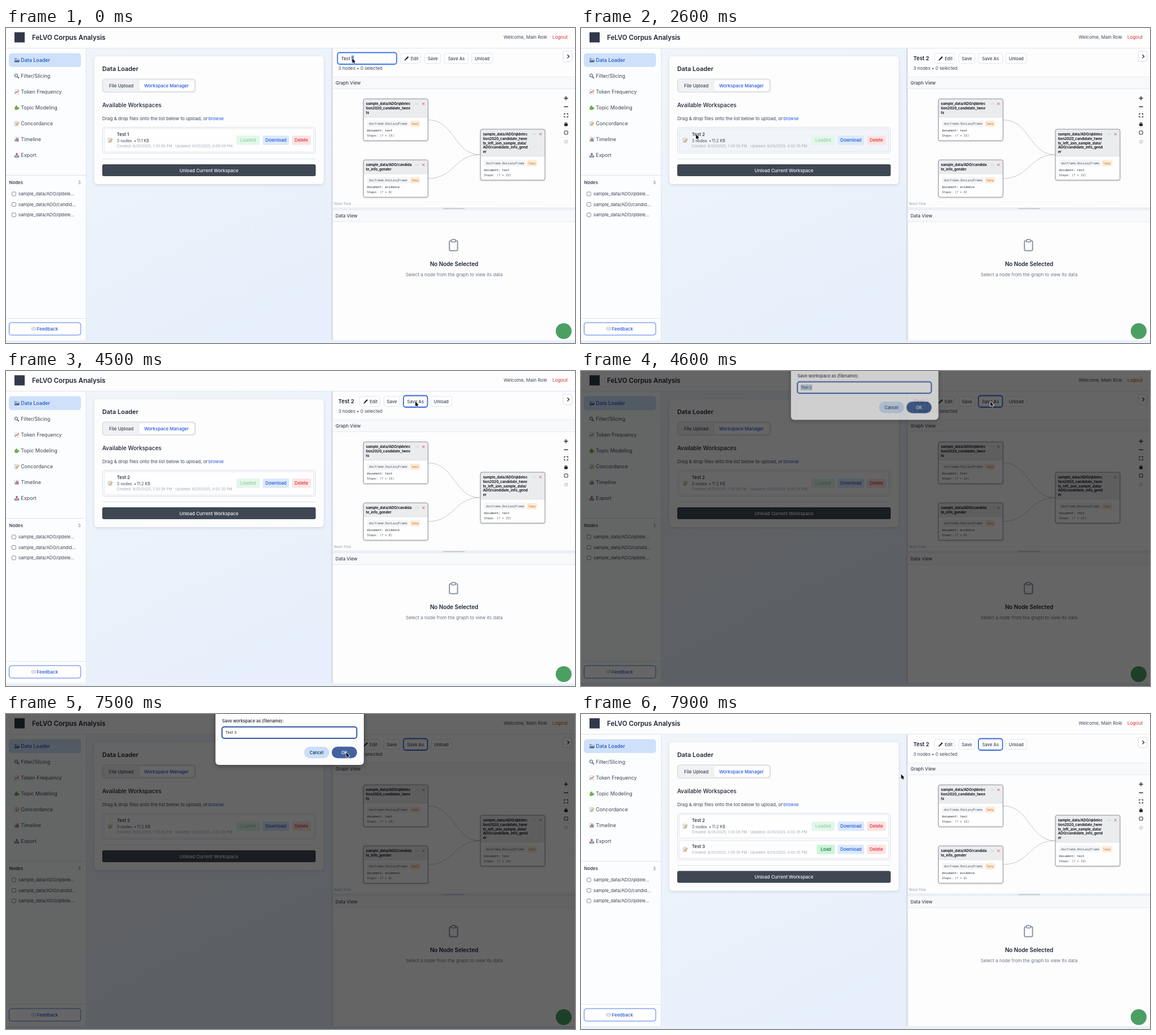
Recreate the animation shown at these times as an HTML page with a canvas. Size 1005 px wide and 557 px high, loop 8 s.

```html
<!DOCTYPE html>
<html lang="en">
<head>
<meta charset="utf-8">
<title>Corpus Analysis</title>
<style>
html, body { margin: 0; width: 100%; height: 100%; overflow: hidden; background: #fff; }
canvas { display: block; width: 1005px; height: 557px; }
</style>
</head>
<body>
<canvas id="stage"></canvas>
<script>
const W = 1005, H = 557, LOOP = 8000;
const SANS = 'Inter, "Open Sans", sans-serif';
const MONO = '"DejaVu Sans Mono", "Liberation Mono", monospace';
const INK = '#1c2330', BODY = '#3d4654', MUTED = '#6b7482', BLUE = '#2257d6', RED = '#d8302f';
const dpr = window.devicePixelRatio || 1;

function setUp(canvas) {
  canvas.width = W * dpr;
  canvas.height = H * dpr;
  const ctx = canvas.getContext('2d');
  ctx.scale(dpr, dpr);
  return ctx;
}

const stage = setUp(document.getElementById('stage'));
const layer = setUp(document.createElement('canvas'));
let c = stage; // where the helpers draw

// Times of the hard changes, in ms
const TYPED = 500, RENAMED = 900, SAVED = 1000, FOCUS = 4300, OPEN = 4600,
      CLICKED = 5900, ERASED = 6500, RETYPED = 6800, CLOSE = 7700, ADDED = 7800;

// Pointer stops: time, x, y
const POINTER = [
  [0, 611.5, 53.5], [1200, 611.5, 53.5], [2200, 203, 188], [3100, 203, 188],
  [4200, 723, 54], [4900, 723, 54], [5800, 437, 40], [6800, 437, 40],
  [7300, 601, 68], [7650, 601, 68], [7900, 565.5, 106.5], [LOOP, 565.5, 106.5]
];

function pointerAt(t) {
  const i = POINTER.findIndex(p => p[0] > t);
  const [t0, x0, y0] = POINTER[i - 1], [t1, x1, y1] = POINTER[i];
  const p = (t - t0) / (t1 - t0), e = p * p * (3 - 2 * p);
  return [x0 + (x1 - x0) * e, y0 + (y1 - y0) * e];
}

const inside = ([px, py], x, y, w, h) => px >= x && px <= x + w && py >= y && py <= y + h;

function rect(x, y, w, h, fill) {
  c.fillStyle = fill;
  c.fillRect(x, y, w, h);
}

function box(x, y, w, h, r, fill, stroke, lw = 1) {
  c.beginPath();
  c.roundRect(x, y, w, h, r);
  if (fill) { c.fillStyle = fill; c.fill(); }
  if (stroke) { c.strokeStyle = stroke; c.lineWidth = lw; c.stroke(); }
}

function line(color, lw, ...pts) {
  c.beginPath();
  for (let i = 0; i < pts.length; i += 2) c.lineTo(pts[i], pts[i + 1]);
  c.strokeStyle = color;
  c.lineWidth = lw;
  c.stroke();
}

function poly(fill, ...pts) {
  c.beginPath();
  for (let i = 0; i < pts.length; i += 2) c.lineTo(pts[i], pts[i + 1]);
  c.closePath();
  c.fillStyle = fill;
  c.fill();
}

function disc(x, y, r, fill, stroke, lw = 1) {
  c.beginPath();
  c.arc(x, y, r, 0, 7);
  if (fill) { c.fillStyle = fill; c.fill(); }
  if (stroke) { c.strokeStyle = stroke; c.lineWidth = lw; c.stroke(); }
}

// y is the middle of the capitals
function text(s, x, y, size, color = BODY, weight = 400, align = 'left', font = SANS) {
  c.font = `${weight} ${size}px ${font}`;
  c.textAlign = align;
  c.fillStyle = color;
  c.fillText(s, x, y + size * 0.36);
}

const mono = (s, x, y, color = '#4a5261') => text(s, x, y, 5.34, color, 400, 'left', MONO);

function shadow(color, blur, dy, draw) {
  c.save();
  c.shadowColor = color;
  c.shadowBlur = blur * dpr;
  c.shadowOffsetY = dy * dpr;
  draw();
  c.restore();
}

// Small pictures, each about 9 px wide around its own centre
const icons = {
  folder() {
    box(-4, -3.5, 4, 3, 1, '#5b83b4');
    box(-4, -2.5, 8.5, 6, 0.8, '#7fa3c9');
    rect(-2.5, -1.5, 6, 1.5, '#e9e2b8');
    poly('#4c6f9c', -4, 3.5, -2.5, 0, 5, 0, 4, 3.5);
  },
  search() {
    line('#4a4f58', 1.5, 1, 1, 4, 4);
    disc(-1, -1, 2.8, '#cfe5f4', '#59606b', 1);
  },
  chart() {
    box(-4, -4, 8, 8, 0.5, '#f4f6f8', '#c3ccd6', 0.6);
    line('#d8443c', 1.1, -3.4, 2.6, -1, -0.2, 0.6, 1, 3.4, -3);
  },
  puzzle() {
    box(-3.6, -1.8, 6, 5.6, 0.8, '#6fae4a');
    disc(-0.6, -2.4, 1.5, '#6fae4a');
    disc(3, 0.8, 1.5, '#6fae4a');
  },
  memo() {
    box(-3.8, -4, 6.8, 8, 0.5, '#f1f1ec', '#b9bcc0', 0.6);
    for (let y = -2; y < 3; y += 1.6) line('#a9b3bd', 0.6, -2.6, y, 1.8, y);
    line('#e0a030', 1.6, -0.6, 2.4, 4, -2);
    line('#4c4033', 1, -1.2, 3, -0.5, 2.3);
  },
  bars() {
    box(-4, -4, 8, 8, 0.5, '#f4f6f8', '#c3ccd6', 0.6);
    rect(-3, -0.5, 1.6, 4, '#49a35a');
    rect(-0.8, -3, 1.6, 6.5, '#d8443c');
    rect(1.4, -1.6, 1.6, 5.1, '#3b78c9');
  },
  tray() {
    poly('#6b8fb8', -4.2, 0, 4.2, 0, 4.2, 4, -4.2, 4);
    rect(-2.4, 0.4, 4.8, 1.5, '#dfe8f1');
    poly('#d8443c', 0, -4.4, 2.6, -1.6, 0.9, -1.6, 0.9, 1, -0.9, 1, -0.9, -1.6, -2.6, -1.6);
  },
  bubble() {
    box(-4, -3, 8, 5.4, 2.6, '#f3f5f8', '#9aa4b2', 0.7);
    for (const x of [-2, 0, 2]) disc(x, -0.3, 0.5, '#6b7482');
  },
  pencil() {
    line('#1c2330', 2.2, -1.8, 1.8, 2.8, -2.8);
    poly('#1c2330', -4, 4, -3, 1, -1, 3);
  }
};

function icon(name, x, y) {
  c.save();
  c.translate(x, y);
  icons[name]();
  c.restore();
}

function header() {
  rect(0, 0, W, 36, '#fdfdfe');
  rect(0, 35.3, W, 1, '#dde4ee');
  rect(15, 7.5, 18, 18, '#33384a');
  text('FeLVO Corpus Analysis', 46, 16.7, 11.5, INK, 600);
  text('Welcome, Main Role', 879, 16.5, 8, BODY);
  text('Logout', 965, 16.5, 8.2, RED);
}

const MENU = [['folder', 'Data Loader'], ['search', 'Filter/Slicing'], ['chart', 'Token Frequency'],
  ['puzzle', 'Topic Modeling'], ['memo', 'Concordance'], ['bars', 'Timeline'], ['tray', 'Export']];

function sidebar() {
  rect(0, 36, 141, 516, '#fcfdfe');
  rect(141, 36, 1, 516, '#dfe5ee');
  box(5.5, 45, 126.5, 23.5, 4.5, '#cfe1fa', '#c0d7f6', 0.6);
  MENU.forEach(([pic, label], i) => {
    const y = 57 + i * 28;
    icon(pic, 19, y);
    text(label, 26.3, y, 8.9, i ? BODY : '#2052c4', i ? 400 : 500);
  });
  rect(0, 260, 141, 1, '#dfe3ea');
  text('Nodes', 5.5, 273.5, 7.8, BODY, 600);
  text('3', 132, 273.5, 7.5, MUTED, 400, 'right');
  ['qldele', 'candid', 'qldele'].forEach((s, i) => {
    const y = 293.3 + i * 18.5;
    box(10.5, y - 3.3, 6.8, 6.8, 1.3, '#fff', '#767c86', 0.9);
    text(`sample_data/ADO/${s}...`, 22, y, 7.9, BODY);
  });
  rect(0, 513, 141, 1, '#dfe3ea');
  box(5.5, 521, 126.5, 22, 4, '#fff', '#4a7ae8');
  icon('bubble', 49, 532);
  text('Feedback', 54.5, 532, 8, BLUE, 500);
}

function pill(label, x, y, w, fill, color) {
  box(x, y - 8.2, w, 16.4, 2.5, fill);
  text(label, x + w / 2, y, 7.8, color, 500, 'center');
}

function row(y, h, name, size, updated, hover) {
  const mid = y + h / 2;
  box(173.5, y, 370, h, 3, hover ? '#f1f4f9' : '#fefeff', '#dde2ea', 0.8);
  icon('memo', 184, mid);
  text(name, 195.8, y + 10.5, 7.9, INK, 500);
  if (size) {
    text('3 nodes', 195.8, y + 21, 7.1, BODY);
    text('•', 226, y + 21, 7.1, BODY);
    text(size, 231.3, y + 21, 7.1, BODY);
  }
  const low = y + h - 10;
  text('Created: 8/25/2025, 1:30:38 PM', 195.8, low, 6.45, '#a2a9b5');
  text('Updated: 8/25/2025, ' + updated, 299, low, 6.45, '#a2a9b5');
  if (size) pill('Loaded', 407, mid, 41.5, '#e3f7ea', '#8fcda4');
  else pill('Load', 416.5, mid, 32, '#cbf4d8', '#1c6b3a');
  pill('Download', 453.5, mid, 46.5, '#dbe9fd', BLUE);
  pill('Delete', 505, mid, 33.5, '#fde3e3', RED);
}

function loader(t, pointer) {
  const saved = t >= SAVED, extra = t >= ADDED ? 36.4 : 0;
  const bg = c.createLinearGradient(142, 36, 400, 557);
  bg.addColorStop(0, '#f1f5fa');
  bg.addColorStop(1, '#e6effb');
  rect(142, 36, 433, 521, bg);
  shadow('rgba(40,60,100,.16)', 5, 1.5, () => box(156, 50, 405, 226 + extra, 5, '#fdfdfe'));
  text('Data Loader', 170, 72.3, 10.9, INK, 600);
  box(170.5, 90, 164, 23.5, 5, '#f0f1f3', '#d3d6dc', 1.2);
  box(235, 92, 97.5, 19.5, 4, '#fff', '#e1e4e9', 0.6);
  text('File Upload', 182, 102, 8.05, BODY, 500);
  text('Workspace Manager', 244, 102, 7.95, BLUE, 500);
  text('Available Workspaces', 170, 136.5, 9.95, INK, 500);
  text('Drag & drop files onto the list below to upload, or', 170, 160, 8.08, BODY);
  text('browse', 357.5, 160, 7.8, BLUE);
  box(170.5, 175.5, 376, 46 + extra, 4, '#f9fafc', '#d9dfe8', 0.9);
  const hover = t < OPEN && inside(pointer, 173, 178, 371, 41);
  row(178, 41, saved ? 'Test 2' : 'Test 1', saved ? '11.2 KB' : '11.1 KB',
      saved ? '4:02:35 PM' : '4:00:39 PM', hover);
  if (extra) row(224, 31, 'Test 3', '', '4:02:35 PM', false);
  rect(170, 231 + extra, 377, 1, '#dde2ea');
  box(170, 241 + extra, 377, 21, 3, '#3e4752');
  text('Unload Current Workspace', 358.5, 251.7 + extra, 8, '#f2f4f6', 500, 'center');
}

function tool(label, x, w, focus) {
  box(x, 45, w, 17.5, 3, '#fff', '#dfe3e9', 0.9);
  if (focus) box(x, 43.5, w, 20.5, 4, null, '#3a6fe0', 1.8);
  if (label === 'Edit') {
    icon('pencil', x + 11, 53.7);
    text(label, x + 18, 54, 7.6, BODY, 500);
  } else text(label, x + w / 2, 54, 7.7, BODY, 500, 'center');
}

function toolbar(t) {
  const edit = t < RENAMED, dx = edit ? 72.2 : 0;
  if (edit) {
    box(585.5, 43.5, 104.5, 20.5, 4, '#fff', '#3a76ee', 1.8);
    if (t < TYPED) rect(610, 48.5, 4.6, 10.5, '#78a8f8');
    text(t < TYPED ? 'Test 1' : 'Test 2', 592, 54, 7.9, INK);
  } else text('Test 2', 587, 54, 9.5, INK, 600);
  tool('Edit', 624.5 + dx, 35.5);
  tool('Save', 667.5 + dx, 28);
  tool('Save As', 702 + dx, 42.5, t >= FOCUS);
  tool('Unload', 750.5 + dx, 36.5);
  text('3 nodes • 0 selected', 587, 71, 7.9, BODY);
  box(984, 41, 16, 18.5, 3, '#fff', '#d5d9e0', 0.9);
  line(INK, 1.3, 991.5, 47.2, 994.6, 50.3, 991.5, 53.4);
}

function node(x, y, h, lines, doc, cols) {
  const head = 9 + lines.length * 7.7, end = y + h;
  shadow('rgba(0,0,0,.2)', 3, 1, () => box(x, y, 114, h, 3, '#fefefe'));
  box(x, y, 114, head, [3, 3, 0, 0], '#ebecee');
  rect(x, y + head, 114, 0.7, '#d3d6da');
  box(x, y, 114, h, 3, null, '#8d9198', 1);
  lines.forEach((s, i) => text(s, x + 4.4, y + 8.6 + i * 7.85, 6.2, '#14181f', 700));
  for (let i = 0; i < 3; i++) disc(x + 92.7 + i * 2.2, y + 8.8, 0.5, '#8a919c');
  line('#d8463f', 0.9, x + 104, y + 6.7, x + 108, y + 10.7);
  line('#d8463f', 0.9, x + 108, y + 6.7, x + 104, y + 10.7);
  box(x + 6.5, end - 35.5, 73.5, 11, 2, '#f3f4f6');
  mono('docframe.DocLazyFrame', x + 10, end - 30);
  box(x + 82, end - 35.5, 18, 11, 2.5, '#fdebd6');
  mono('lazy', x + 84.6, end - 30, '#c2571a');
  mono('document: ' + doc, x + 6.2, end - 18.3, '#222832');
  mono(`Shape: (? × ${cols})`, x + 6.2, end - 9.3);
}

function edge(y) {
  c.beginPath();
  c.moveTo(746, y);
  c.bezierCurveTo(792, y, 792, 224, 837, 224);
  c.strokeStyle = '#b4b6bb';
  c.lineWidth = 0.8;
  c.stroke();
}

function controls() {
  box(982, 116.5, 14.5, 92, 1, '#fefefe');
  for (let y = 131.5; y < 200; y += 15.4) rect(982, y, 14.5, 0.6, '#eceef1');
  line(INK, 1.4, 985.5, 124.2, 992.7, 124.2);
  line(INK, 1.4, 989.1, 120.6, 989.1, 127.8);
  line(INK, 1.4, 985.5, 139.3, 992.7, 139.3);
  for (const sx of [-1, 1]) for (const sy of [-1, 1])
    line(INK, 1.1, 989.2 + sx, 154.5 + sy * 3, 989.2 + sx * 3.2, 154.5 + sy * 3, 989.2 + sx * 3.2, 154.5 + sy);
  c.beginPath();
  c.arc(989, 168.7, 1.7, Math.PI, 0);
  c.strokeStyle = INK;
  c.lineWidth = 1;
  c.stroke();
  box(986.2, 168.8, 5.8, 4.6, 0.6, INK);
  box(986.2, 182, 6, 6, 1, null, INK, 1);
  disc(989.2, 201, 2.8, null, '#a7adb7', 0.8);
  line('#a7adb7', 0.8, 987.4, 202.9, 991, 199.1);
}

function sectionBar(label, y) {
  rect(577, y - 10.7, 428, 21.4, '#f8f9fb');
  rect(577, y - 10.7, 428, 0.8, '#e4e8ee');
  rect(577, y + 10, 428, 0.8, '#e1e5eb');
  text(label, 582, y, 8, BODY, 500);
}

function rightPanel(t) {
  rect(577, 36, 428, 516, '#fdfdfe');
  rect(574.5, 36, 2.8, 516, '#d6dce6');
  toolbar(t);
  sectionBar('Graph View', 97);
  for (let y = 113; y < 316; y += 9)
    for (let x = 582; x < W; x += 9) rect(x, y, 0.8, 0.8, '#e8eaee');
  edge(162.5);
  edge(266);
  node(631.3, 125.3, 74, ['sample_data/ADO/qldelec', 'tion2020_candidate_twee', 'ts'], 'text', 15);
  node(631.3, 233.2, 66, ['sample_data/ADO/candida', 'te_info_gender'], 'evidence', 8);
  node(838, 179, 90, ['sample_data/ADO/qldelec', 'tion2020_candidate_twee',
    'ts_left_join_sample_data/', 'ADO/candidate_info_gend', 'er'], 'text', 22);
  controls();
  text('React Flow', 579.3, 311, 5.8, '#9aa0a9');
  rect(577, 317, 428, 4.5, '#eceff4');
  rect(772, 318.7, 38, 1.2, '#b3bac6');
  sectionBar('Data View', 332);
  box(783.2, 376.3, 14.4, 17.5, 2.2, null, '#8d96a6', 2);
  box(786.8, 373.8, 7.2, 4.6, 1.6, '#fdfdfe', '#8d96a6', 1.8);
  text('No Node Selected', 791.5, 417, 9.8, INK, 600, 'center');
  text('Select a node from the graph to view its data', 791.5, 435.7, 8.08, MUTED, 400, 'center');
}

function dialog(t, pointer) {
  shadow('rgba(0,0,0,.35)', 8, 2, () => box(370, -12, 262, 102, 6, '#fdfdfe'));
  text('Save workspace as (filename):', 381.7, 12.3, 7.4, '#20242c', 500);
  box(381.5, 22.7, 238, 20.3, 4, '#fff', '#2f56a3', 2);
  if (t < CLICKED) rect(387.3, 27.5, 20.5, 10.5, '#c3d0e4');
  const value = t < ERASED ? 'Test 2' : t < RETYPED ? 'Test ' : 'Test 3';
  text(value, 387.5, 32.8, 6.8, '#20242c');
  box(526.5, 57.7, 44.5, 20.5, 10.2, '#cbdef8');
  text('Cancel', 548.5, 68, 7.4, '#16294a', 500, 'center');
  box(575.3, 57.7, 44.7, 20.5, 10.2, inside(pointer, 575, 57, 45, 21) ? '#43639f' : '#2e4f8b');
  text('OK', 597.5, 68, 7.3, '#fff', 500, 'center');
}

// Dims the page and lets the dialog slide and fade in as one sheet
function modalSheet(t, pointer) {
  const p = Math.min(1, (t - OPEN) / 100), k = 0.994 + 0.006 * p;
  c = layer;
  c.clearRect(0, 0, W, H);
  dialog(t, pointer);
  c = stage;
  rect(0, 0, W, H, 'rgba(0,0,0,.6)');
  c.save();
  c.globalAlpha = 0.7 + 0.3 * p;
  c.translate(501 * (1 - k), -3.7 * (1 - p));
  c.drawImage(layer.canvas, 0, 0, W * k, H);
  c.restore();
}

function arrow([x, y]) {
  c.save();
  c.translate(x, y);
  c.beginPath();
  for (const [px, py] of [[0, 0], [0, 8.4], [1.9, 6.7], [3.1, 9.4], [4.5, 8.8], [3.4, 6.2], [5.9, 6]]) c.lineTo(px, py);
  c.closePath();
  c.lineJoin = 'round';
  c.strokeStyle = '#fff';
  c.lineWidth = 1.3;
  c.stroke();
  c.fillStyle = '#0b0b0d';
  c.fill();
  c.restore();
}

function beam([x, y]) {
  line('#16181c', 0.9, x, y - 3.5, x, y + 3.5);
  for (const s of [-1, 1]) line('#16181c', 0.8, x - 1.6, y + s * 4.2, x, y + s * 3.4, x + 1.6, y + s * 4.2);
}

function draw(t) {
  const pointer = pointerAt(t), modal = t >= OPEN && t < CLOSE;
  rect(0, 0, W, H, '#e9f1fb');
  loader(t, pointer);
  sidebar();
  rightPanel(t);
  header();
  rect(0, 552, W, 5, '#e9f1fb');
  disc(985, 536, 14, '#4c9f63');
  if (modal) modalSheet(t, pointer);
  if (modal && inside(pointer, 381, 22, 239, 21)) beam(pointer);
  else arrow(pointer);
}

function tick() {
  draw(performance.now() % LOOP);
  requestAnimationFrame(tick);
}
tick();
</script>
</body>
</html>
```
